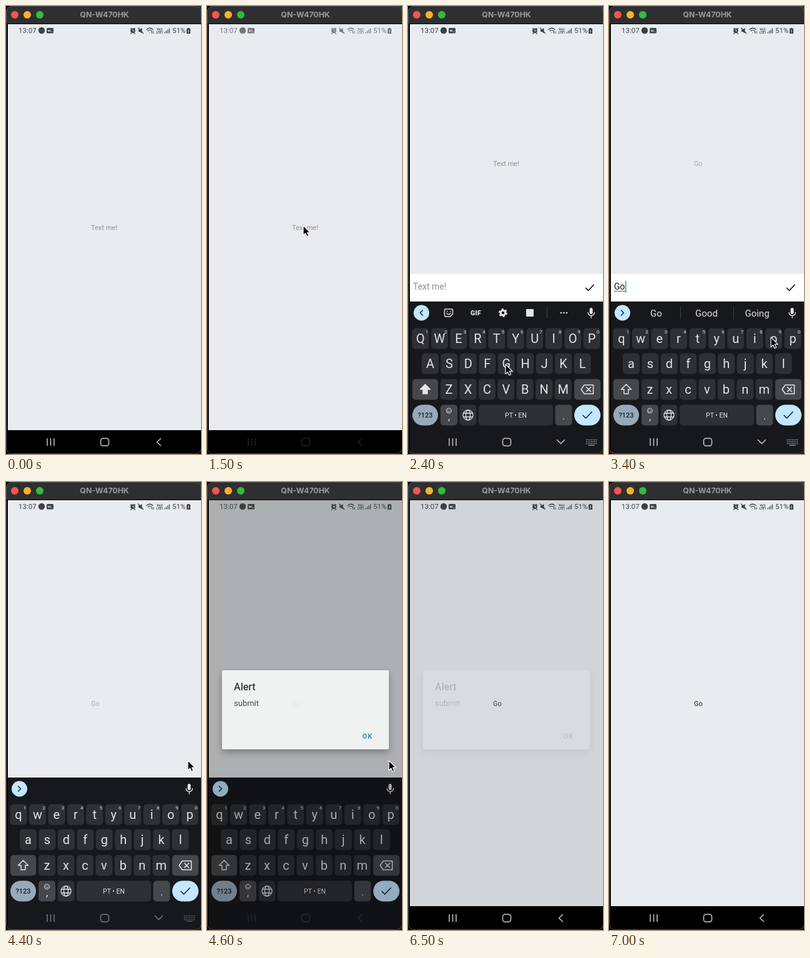
Write an HTML page that moves like this. It is 312 px wide and 714 px high and loops after 7.9 s.

```html
<!DOCTYPE html>
<html lang="en">
<head>
<meta charset="utf-8">
<title>Text input demo</title>
<style>
  html, body { margin: 0; width: 100%; height: 100%; overflow: hidden; background: #000; }
  svg { display: block; width: 312px; height: 714px; font-family: Roboto, "Noto Sans", sans-serif; }
  .line { fill: none; stroke: currentColor; stroke-linecap: round; stroke-linejoin: round; }
  .mid { text-anchor: middle; }
  #alert rect { filter: drop-shadow(0 5px 6px rgba(0, 0, 0, .35)); }
</style>
</head>
<body>
<svg viewBox="0 0 312 714">
  <rect width="312" height="714"/>
  <rect x="3" y="29" width="309" height="647" fill="#e8ecf0"/>
  <text id="label" x="136" font-size="11"></text>

  <g id="panel">
    <g id="bar">
      <rect x="3" y="427" width="309" height="44" fill="#fff"/>
      <text id="field" x="8" y="452" font-size="14"></text>
      <path id="under" d="M8 454.5H26" stroke="#333" stroke-width=".8"/>
      <rect id="caret" x="26" y="438" width="1.6" height="19" fill="#10b9a5"/>
      <path class="line" d="M284.5 449.5l4 4 8.500-9" stroke-width="1.700" color="#111"/>
    </g>
    <rect x="3" y="471" width="309" height="243" fill="#17181c"/>
    <g color="#e3e4e8" fill="#e3e4e8">
      <circle cx="21.500" cy="489" r="12.500" fill="#c2e7ff"/>
      <path id="fold" class="line" stroke-width="1.600" color="#1b2a38"/>
      <g id="tools">
        <path class="line" d="M60.500 483h9a2 2 0 0 1 2 2v6l-4 4h-7a2 2 0 0 1-2-2v-8a2 2 0 0 1 2-2M62 490q3 3 6 0" stroke-width="1.500"/>
        <path d="M62 486h1.500v1.500h-1.500zM67 486h1.500v1.500h-1.500z"/>
        <text class="mid" x="108.500" y="493" font-size="10.500" font-weight="900" letter-spacing=".3">GIF</text>
        <circle cx="152" cy="489" r="3.800" class="line" stroke-width="3"/>
        <circle cx="152" cy="489" r="6" fill="none" stroke="currentColor" stroke-width="2" stroke-dasharray="3.140"/>
        <rect x="189" y="483" width="12" height="12" rx="1"/>
        <path d="M222.500 480v18" stroke="#45474c"/>
        <path class="line" d="M245 489h0M249.500 489h0M254 489h0" stroke-width="2.600"/>
      </g>
      <g id="hints" class="mid" font-size="15">
        <path d="M114.500 479v20M199.500 479v20" stroke="#3c3e43"/>
        <text x="75.500" y="495">Go</text>
        <text x="156" y="495">Good</text>
        <text x="237" y="495">Going</text>
      </g>
      <rect x="290.500" y="481" width="5" height="10" rx="2.500"/>
      <path class="line" d="M288 488.500a5.200 5 0 0 0 10.400 0M293.200 494v3" stroke-width="1.400"/>
      <g id="keys"></g>
      <path id="shift" class="line" d="M27.500 603l8 8h-4.500v7h-7v-7h-4.500z" stroke-width="1.500"/>
      <path class="line" d="M277 611l5-7h14.500v14h-14.500zM285.500 607.500l7 7M292.500 607.500l-7 7" stroke-width="1.500"/>
      <text class="mid" x="27.500" y="656" font-size="11" font-weight="500" fill="#14202b">?123</text>
      <circle cx="65.500" cy="645" r="4" class="line" stroke-width="1"/>
      <path class="line" d="M64 643.500h0M67 643.500h0M63.500 646q2 2 4 0" stroke-width="1"/>
      <text class="mid" x="65.500" y="660" font-size="16">,</text>
      <g class="line" stroke-width="1.300">
        <circle cx="96" cy="652" r="8"/>
        <ellipse cx="96" cy="652" rx="3.500" ry="8"/>
        <path d="M89 649h14M89 655h14"/>
      </g>
      <text class="mid" x="172.500" y="656" font-size="10.500">PT • EN</text>
      <text class="mid" x="249" y="659" font-size="16">.</text>
      <path class="line" d="M280 652.500l4.500 4.500 9.500-10" stroke-width="1.700" color="#1b2a38"/>
    </g>
  </g>

  <rect id="navBack" x="3" y="676" width="309" height="38"/>
  <rect id="dim" x="3" y="29" width="309" height="685"/>

  <g id="nav" class="line" color="#c6c7c9" stroke-width="1.500">
    <path d="M66 689.500v11M71.500 689.500v11M77 689.500v11"/>
    <rect x="151.500" y="689" width="13" height="12" rx="3.800"/>
    <path id="back" d="M247.500 689.500l-6 5.500 6 5.500"/>
    <g id="down">
      <path d="M238.500 691.500l6 6 6-6"/>
      <path d="M285.500 691.500h16M285.500 694.500h16M285.500 697.500h16" stroke-width="1.400" stroke-dasharray=".1 2.560"/>
      <path d="M289 700h9" stroke-width="1.200"/>
    </g>
  </g>

  <g id="alert">
    <rect x="24" y="300" width="267" height="126" rx="2" fill="#fff"/>
    <text x="43" y="332" font-size="16" font-weight="500" fill="#1d1d1f">Alert</text>
    <text x="43" y="357" font-size="13" fill="#333">submit</text>
    <text x="248.500" y="409" font-size="11" font-weight="500" letter-spacing="1" fill="#1678bd">OK</text>
  </g>

  <g id="status" fill="currentColor" font-size="11.500">
    <text x="20" y="43">13:07</text>
    <circle cx="57" cy="39" r="5.200"/>
    <rect x="65" y="35" width="11" height="8.500" rx="1.500"/>
    <path d="M67 38l1 3 1.200-3 1.200 3 1-3M73 41h1" class="line" style="stroke:#e8ecf0" stroke-width=".8"/>
    <circle cx="203" cy="39.500" r="3.800"/>
    <path class="line" d="M199.500 36.500l1.500-1M206.500 36.500l-1.500-1M200.500 43.500l-1 .8M205.500 43.500l1 .8" stroke-width="1.300"/>
    <path d="M203 37.500v2.500h1.800" class="line" style="stroke:#e8ecf0" stroke-width=".9"/>
    <path d="M212 37.500h2l3.500-2.500v8.500l-3.500-2.500h-2z"/>
    <path class="line" d="M211.500 35l8 8.500" stroke-width="1.200"/>
    <g class="line" stroke-width="1.200">
      <path d="M225 37.500q5-4.500 10 0M227 39.800q3-2.600 6 0M230 42.300h0"/>
      <path d="M233.500 43.500v-3M236 40.500v3" stroke-width="1"/>
    </g>
    <g class="mid" font-size="5" font-weight="700">
      <text x="246" y="39">Vo))</text>
      <text x="246" y="44">LTE1</text>
    </g>
    <path d="M254 43.500v-2M256.500 43.500v-4M259 43.500v-6M261.500 43.500v-8" stroke="currentColor" stroke-width="1.200"/>
    <text x="266" y="43">51%</text>
    <path d="M290.500 35h3v1h1.500v8h-6v-8h1.500z"/>
    <path d="M292.500 37.500l-1.500 2.500h2l-1.500 2.500" class="line" style="stroke:#e8ecf0" stroke-width=".7"/>
  </g>

  <path d="M0 28V9a9 9 0 0 1 9-9H312V28z" fill="#2f2f31"/>
  <circle cx="14" cy="14" r="6" fill="#f9544d"/>
  <circle cx="34" cy="14" r="6" fill="#f8b228"/>
  <circle cx="54" cy="14" r="6" fill="#30bd3c"/>
  <text class="mid" x="157.500" y="18" font-family="Inter, sans-serif" font-size="12.300" font-weight="700" fill="#9b9b9d">QN-W470HK</text>
  <rect x=".5" y=".5" width="312" height="713" rx="9" fill="none" stroke="#4b4b4d"/>

  <path id="cursor" d="M0 0v15.500l3.600-3.400 2.300 5.400 2.700-1.200-2.300-5.200h4.900z" stroke="#fff" stroke-width="1.100" stroke-linejoin="round"/>
</svg>
<script>
const $ = id => document.getElementById(id);
const LOOP = 7900, STEP = 100;
const ramp = (t, a, b) => Math.max(0, Math.min(1, (t - a) / (b - a)));
const ease = p => p * p * (3 - 2 * p);
const show = (id, on) => $(id).style.display = on ? '' : 'none';
const set = (id, name, value) => $(id).setAttribute(name, value);

function key(x, y, w, fill, rx = 5) {
  return `<rect x="${x - w / 2}" y="${y - 16.5}" width="${w}" height="33" rx="${rx}" fill="${fill}"/>`;
}

function buildKeys() {
  const plain = '#2e3035', side = '#45474c', pitch = 30.45;
  let out = '';
  [['qwertyuiop', 20, 530], ['asdfghjkl', 35.5, 570], ['zxcvbnm', 65.5, 611]].forEach(([row, x0, y], r) => {
    [...row].forEach((ch, i) => {
      const x = x0 + i * pitch;
      out += key(x, y, 27, plain) + `<text class="mid letter" x="${x}" y="${y + 7}" font-size="20">${ch}</text>`;
      if (r === 0) out += `<text class="mid" x="${x + 10}" y="522" font-size="8">${(i + 1) % 10}</text>`;
    });
  });
  out += key(27.5, 611, 41, side) + key(287, 611, 42, side);
  out += key(27.5, 652, 41, '#98a9ba', 16.5) + key(65.5, 652, 27, side) + key(96, 652, 27, plain);
  out += key(172.5, 652, 119, plain) + key(249, 652, 27, side) + key(287, 652, 42, '#c2e7ff', 16.5);
  $('keys').innerHTML = out;
}

// time, x, y
const path = [
  [700, 215, 560], [1200, 154, 350], [2200, 154, 350], [2400, 156, 571], [2500, 156, 571],
  [2900, 259, 528], [3700, 259, 528], [4000, 291, 444], [5000, 291, 444], [5600, 253, 398], [6500, 253, 398]
];

function drawCursor(t) {
  const i = path.findIndex(p => t < p[0]);
  show('cursor', i > 0);
  if (i < 1) return;
  const [a, x, y] = path[i - 1], [b, u, v] = path[i];
  const p = ease(ramp(t, a, b));
  set('cursor', 'transform', `translate(${x + (u - x) * p} ${y + (v - y) * p})`);
}

function drawInput(t, up) {
  const typed = t < 2600 ? '' : t < 3000 ? 'G' : 'Go';
  const editing = t >= 1600 && t < 4300;
  const center = editing ? 352.5 - 102.5 * up : 352.5;
  $('label').textContent = typed || 'Text me!';
  set('label', 'y', center + 4.5);
  set('label', 'fill', t >= 6300 ? '#1b1c1e' : typed ? '#a5a8ab' : '#8f9295');

  show('bar', editing);
  $('field').textContent = typed || 'Text me!';
  set('field', 'fill', typed ? '#111' : '#8d8d8f');
  const end = typed ? typed === 'G' ? 18 : 26 : 8;
  show('under', typed);
  set('under', 'd', `M8 454.5H${end}`);
  set('caret', 'x', end);
  show('caret', (t - (typed ? 3000 : 1900)) % 1000 < 500);
}

function drawKeyboard(t, up) {
  const upper = t < 2600;
  show('panel', t >= 1600 && t < 4800);
  set('panel', 'transform', `translate(0 ${205 * (1 - up)})`);
  for (const el of letters) el.textContent = upper ? el.textContent.toUpperCase() : el.textContent.toLowerCase();
  $('shift').style.fill = upper ? 'currentColor' : 'none';
  set('fold', 'd', upper ? 'M23.5 485l-4 4 4 4' : 'M19.5 485l4 4-4 4');
  show('tools', upper);
  show('hints', !upper && t < 4200);
}

function drawNav(t, up) {
  const open = t >= 1700 && t < 4500;
  set('navBack', 'fill', up > .2 ? '#17181c' : '#000');
  show('down', open);
  show('back', !open);
  const alpha = t < 1600 ? 1 - .83 * ramp(t, 1200, 1500)
    : t < 1700 ? .3
    : t < 4800 ? 1 - .87 * ramp(t, 4300, 4500) : 1;
  set('nav', 'opacity', alpha);
}

function drawAlert(t) {
  const closing = t >= 6000;
  const p = closing ? 1 - ramp(t, 6250, 6550) : ramp(t, 4470, 4770);
  set('dim', 'opacity', .59 * p);
  set('alert', 'opacity', closing ? p : Math.min(1, 1.9 * p));
  const faded = t >= 1300 && t < 1800;
  $('status').style.color = p > .6 ? '#fff' : faded ? '#75787b' : '#3e4144';
}

function draw(now) {
  const t = Math.floor(now % LOOP / STEP) * STEP;
  const up = ease(ramp(t, 1550, 1950)) * (1 - ramp(t, 4600, 4800));
  drawInput(t, up);
  drawKeyboard(t, up);
  drawNav(t, up);
  drawAlert(t);
  drawCursor(t);
}

buildKeys();
const letters = document.querySelectorAll('.letter');
const start = performance.now();
function tick() {
  draw(performance.now() - start);
  requestAnimationFrame(tick);
}
tick();
</script>
</body>
</html>
```
